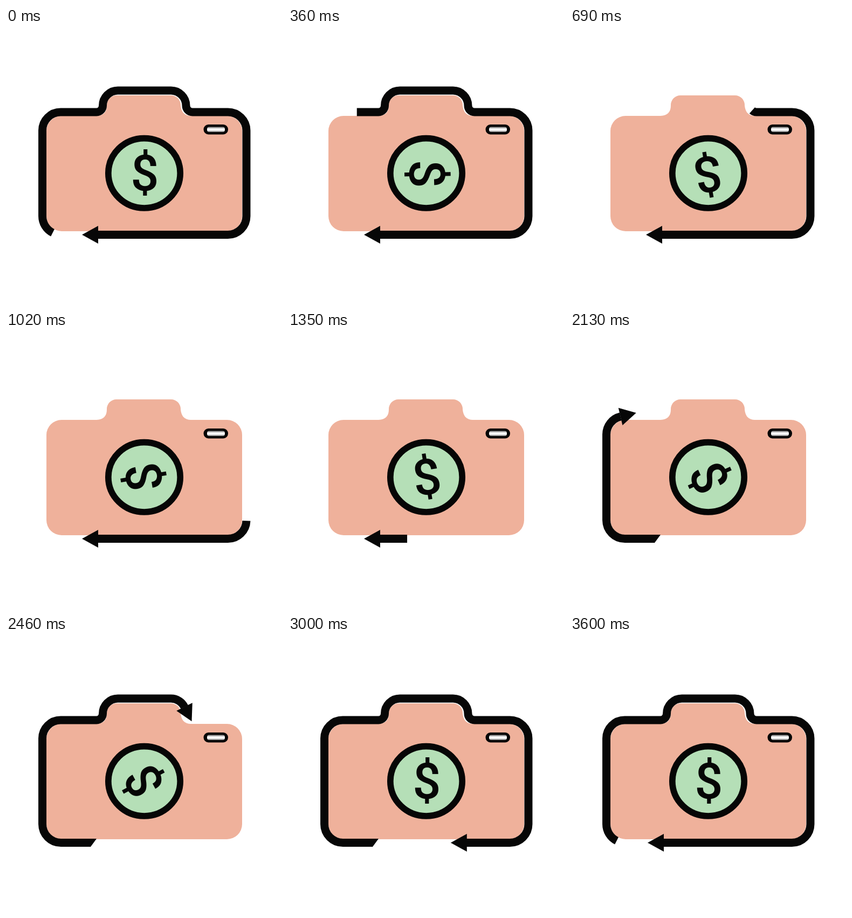
An HTML page that plays this animation: 512x512 px, repeating every 3.63 s.

```html
<!DOCTYPE html>
<html lang="en">
<head>
<meta charset="utf-8">
<title>Camera earnings</title>
<style>
  html, body { margin: 0; width: 100%; height: 100%; overflow: hidden; background: #fff; }
  svg { display: block; width: 100vw; height: 100vh; }
  #dollar { font: 500 92px Roboto, sans-serif; text-anchor: middle; fill: #060606; }
</style>
</head>
<body>
<svg viewBox="0 0 512 512">
  <defs>
    <linearGradient id="shine" x2="0" y2="1">
      <stop offset="0" stop-color="#777"/>
      <stop offset=".4" stop-color="#fff"/>
      <stop offset=".65" stop-color="#fff"/>
      <stop offset="1" stop-color="#777"/>
    </linearGradient>
  </defs>
  <path fill="#efb19b" d="M103 377A28 28 0 0 1 75 349V191A28 28 0 0 1 103 163H168
    Q187 162 187 144A18 18 0 0 1 205 125H306A18 18 0 0 1 324 144Q326 163 343 163
    H410A28 28 0 0 1 438 191V349A28 28 0 0 1 410 377Z"/>
  <path id="line" fill="none" stroke="#070707" stroke-width="15" d="M171 383.5H102
    A34.5 34.5 0 0 1 67.5 349V190A34 34 0 0 1 101.5 156H168A11.75 11.75 0 0 0 179.5 144
    A28 28 0 0 1 207.5 116H306A28 28 0 0 1 334 144A12 12 0 0 0 346 156
    H411.5A34.5 34.5 0 0 1 446 190V349A34.5 34.5 0 0 1 411.5 383.5Z"/>
  <path id="slant" fill="#070707" d="M156 376H168L157 391H156Z"/>
  <path id="arrow" fill="#070707" d="M0 -16.5L30 0L0 16.5Z"/>
  <rect x="366.5" y="179" width="45.5" height="18.5" rx="9" fill="#060606"/>
  <rect x="373" y="183.5" width="33" height="9.5" rx="4" fill="url(#shine)"/>
  <ellipse cx="256.5" cy="269.3" rx="66.7" ry="64.7" fill="#b5dfb7" stroke="#060606" stroke-width="11.7"/>
  <text id="dollar" x="257.5" y="301.4">$</text>
</svg>
<script>
const LOOP = 3630, STEP = 30, REST = 14;
const get = id => document.getElementById(id);
const line = get('line'), slant = get('slant'), arrow = get('arrow'), dollar = get('dollar');
const len = line.getTotalLength();

// Keys are [time in ms, value] pairs
const tailOut = [[0, 85], [540, 500], [690, 616.5], [1080, 957], [1350, 1148], [1440, len]];
const headIn = [[1500, 0], [1620, 35], [1830, 104], [2160, 350], [2460, 594],
  [2700, 805], [3000, 1038], [3240, len - 3]];
const tailIn = [[3240, REST], [3600, 85]];
const spin = [[0, 0], [690, 170], [1350, 351], [1830, 625], [2460, 962], [2680, 1080]];

function at(keys, t) {
  if (t <= keys[0][0]) return keys[0][1];
  for (let i = 1; i < keys.length; i++) {
    const [t0, a] = keys[i - 1], [t1, b] = keys[i];
    if (t < t1) return a + (b - a) * (t - t0) / (t1 - t0);
  }
  return keys[keys.length - 1][1];
}

const point = s => line.getPointAtLength((s + len) % len);

function draw(t) {
  const leaving = t < 1500;
  const tail = leaving ? at(tailOut, t) : at(tailIn, t);
  const head = leaving ? len : at(headIn, t);
  const size = head - tail;
  line.style.visibility = size > 0 ? 'visible' : 'hidden';
  line.setAttribute('stroke-dasharray', `0 ${tail} ${Math.max(size, 0)} ${len * 2}`);
  slant.style.visibility = !leaving && t <= 3240 ? 'visible' : 'hidden';

  const p = point(head), a = point(head - 1), b = point(head + 1);
  const turn = Math.atan2(b.y - a.y, b.x - a.x) * 180 / Math.PI;
  arrow.setAttribute('transform', `translate(${p.x} ${p.y}) rotate(${turn})`);
  dollar.setAttribute('transform', `rotate(${at(spin, t)} 257 270)`);
}

function tick() {
  const t = performance.now() % LOOP;
  draw(Math.floor(t / STEP) * STEP);
  requestAnimationFrame(tick);
}
tick();
</script>
</body>
</html>
```
